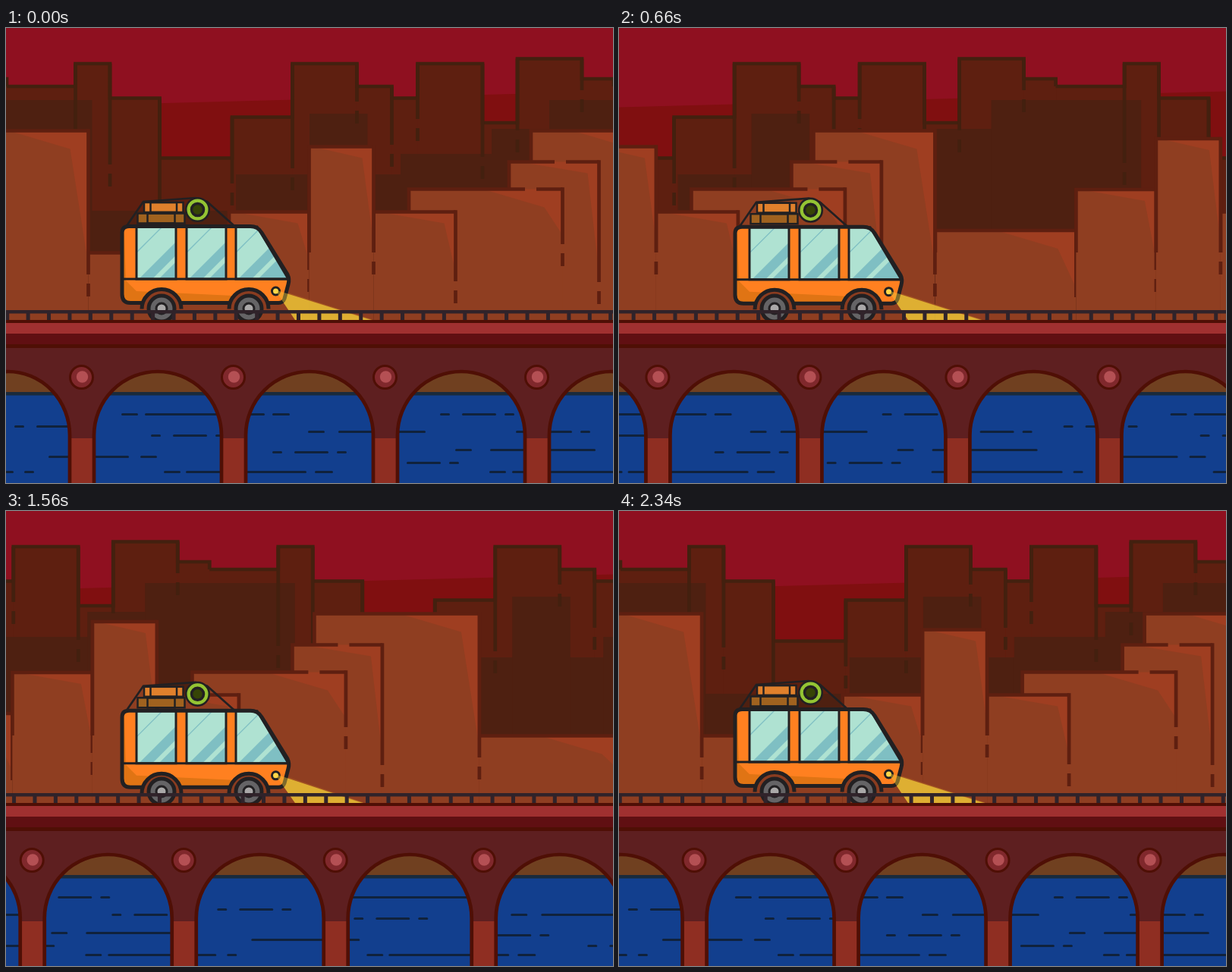
Write an HTML page with a canvas that moves like this. It is 800 px wide and 600 px high and loops after 2.4 s.

```html
<!DOCTYPE html>
<html lang="en">
<head>
<meta charset="utf-8">
<title>Van on a bridge</title>
<style>
html, body { margin: 0; width: 100%; height: 100%; overflow: hidden; background: #8f1020; }
canvas { display: block; width: 800px; height: 600px; }
</style>
</head>
<body>
<canvas id="stage" width="800" height="600"></canvas>
<script>
const ctx = document.getElementById('stage').getContext('2d');
const INK = '#222022', EDGE = '#4f0f05', FAR_EDGE = '#43200f', NEAR_EDGE = '#5e1f10';
const MINT = '#afe2d2', TEAL = '#7fbfc3';
const STEP = 60, STEPS = 40, CYCLE = 39;
const GROUND = 386;

// Pixels moved per step and width of each repeating layer
const FAR = { speed: 20.49, width: 800 };
const NEAR = { speed: 39.6, width: 1545 };
const BRIDGE = { speed: 40.78, width: 795 };

// Each far roof: left edge, height, where its left wall line breaks off
const roofs = [[1, 77], [91.5, 47, 178], [137, 92.5, 180], [202.5, 171.5, 290], [298, 117.5, 205],
  [377.5, 47, 185], [462.5, 77, 97], [508.5, 92.5, 154], [542.5, 47, 120], [628, 125, 170],
  [674, 40.5, 135], [759, 67, 82], [801, 77]];
const shades = [[113, 241], [303, 193], [400, 113], [476, 193], [520, 166], [640, 133], [716, 95], [913, 0]];

function rect(x, y, w, h, color) {
  ctx.fillStyle = color;
  ctx.fillRect(x, y, w, h);
}

function trace(points) {
  ctx.beginPath();
  points.forEach(([x, y]) => ctx.lineTo(x, y));
}

function fill(color) {
  ctx.fillStyle = color;
  ctx.fill();
}

function stroke(color, width) {
  ctx.strokeStyle = color;
  ctx.lineWidth = width;
  ctx.stroke();
}

function line(points, color, width) {
  trace(points);
  stroke(color, width);
}

function poly(points, color) {
  trace(points);
  fill(color);
}

function disc(x, y, r, color, edge, width) {
  ctx.beginPath();
  ctx.arc(x, y, r, 0, Math.PI * 2);
  fill(color);
  if (edge) stroke(edge, width);
}

// A wall line, then a gap and a short dash below it
function wall(x, top, end, color) {
  line([[x, top], [x, end]], color, 4.7);
  if (end < 350) line([[x, end + 12], [x, end + 29]], color, 4.7);
}

function tiled(layer, step, draw) {
  const first = -((layer.speed * step) % layer.width);
  for (let n = 1; n >= -1; n--) {
    ctx.save();
    ctx.translate(first + n * layer.width, 0);
    draw();
    ctx.restore();
  }
}

function sky() {
  rect(0, 0, 800, 400, '#8f1020');
  poly([[0, 104.4], [800, 83.4], [800, 400], [0, 400]], '#800f10');
}

function farCity(step) {
  const columns = (list, color) => list.slice(0, -1).forEach(([x, y], i) =>
    rect(x, y, list[i + 1][0] - x + 0.5, GROUND - y, color));
  tiled(FAR, step, () => columns(roofs, '#5e1f10'));
  tiled(FAR, step, () => columns(shades, '#4e2011'));
  tiled(FAR, step, () => {
    const before = i => roofs[Math.max(i - 1, 0)][1];
    line(roofs.flatMap(([x, y], i) => [[x, before(i)], [x, y]]), FAR_EDGE, 4.7);
    roofs.forEach(([x, y, end], i) => end && wall(x, Math.min(y, before(i)), end, FAR_EDGE));
  });
}

// end: where the right wall line breaks off; gap: start of a break in the roof line
function house(x, w, top, end, gap) {
  const r = x + w, edge = NEAR_EDGE;
  const lit = Math.min(w * 0.94, 105), bend = w < 150 ? 15 : 24;
  rect(x, top, w, GROUND - top, '#8f3e21');
  poly([[r - lit, top], [r - bend, top + bend], [r, end - 12], [r, top]], '#9f3e21');
  line([[x, Math.max(top, 296)], [x, top], [x + (gap || w), top]], edge, 4.7);
  if (gap) line([[x + gap + 15, top], [r, top]], edge, 4.7);
  wall(r, top - 2.3, end, edge);
}

function block(x, low, mid, high, lastWidth) {
  house(x + 583.5, lastWidth, 135.5, 325);
  house(x + 554.5, 118.5, 176.5, 335, 60);
  house(x + 422.5, 202.5, 212.5, 285, 153);
  house(x + 376, 108, 242.5, 334);
  house(x, 185.5, low, 355);
  house(x + 185.5, 105.5, mid, 319);
  house(x + 291, 85, high, 296);
}

function nearCity(step) {
  tiled(NEAR, step, () => {
    block(852.5, 267, 213, 146, 217.5);
    block(108.5, 296.5, 242.5, 156.5, 160);
  });
}

function water(step) {
  rect(0, GROUND, 800, 96, '#704020');
  rect(0, 482, 800, 118, '#123f8e');
  rect(0, 480, 800, 4.5, '#1a2a3c');
  const dash = (x, y, len) => line([[x + 1.5, y + 0.5], [x + len - 1.5, y + 0.5]], '#10223c', 3);
  const ripple = (x, y) => {
    dash(x, y, 13);
    dash(x + 29, y, 45);
    dash(x + 85, y, 13);
  };
  const swell = (x, y, gap, len) => {
    dash(x, y, 22);
    dash(x + 22 + gap, y, len);
  };
  ctx.lineCap = 'round';
  tiled(FAR, step, () => {
    ripple(11, 525);
    ripple(191, 537);
    ripple(351, 559);
    ripple(499, 573);
    ripple(572, 509);
    ripple(672, 532);
    swell(152, 509, 9, 158);
    swell(208, 585, 7, 159);
    swell(398, 532, 18, 115);
    swell(592, 556, 24, 139);
    swell(637, 585, 8, 143);
    dash(56, 565, 106);
    dash(177, 565, 22);
    dash(351, 509, 23);
    dash(407, 585, 24);
    dash(824, 585, 13);
  });
  ctx.lineCap = 'butt';
}

function vaults(pillars) {
  pillars.slice(0, -1).forEach((p, i) => {
    const a = p + 16, b = pillars[i + 1] - 16;
    ctx.moveTo(a, 605);
    ctx.lineTo(a, 537);
    ctx.ellipse((a + b) / 2, 537, (b - a) / 2, 84, 0, Math.PI, Math.PI * 2);
    ctx.lineTo(b, 605);
  });
}

function bridge(step) {
  const first = 100 - ((BRIDGE.speed * step) % BRIDGE.width);
  const pillars = [];
  for (let n = -1; n < 3; n++) {
    for (let i = 0; i < 4; i++) pillars.push(first + n * BRIDGE.width + i * 200);
  }
  ctx.beginPath();
  ctx.rect(-1800, 415, 4800, 190);
  vaults(pillars);
  ctx.fillStyle = '#5e1f20';
  ctx.fill('evenodd');
  pillars.forEach(p => rect(p - 16, 541, 32, 59, '#8f2e22'));
  ctx.beginPath();
  vaults(pillars);
  stroke(EDGE, 4.7);
  pillars.forEach(p => {
    disc(p - 0.5, 460.5, 15, '#80282c', EDGE, 3);
    disc(p + 0.5, 460, 7.7, '#b45054');
  });
  rect(0, 385, 800, 4, EDGE);
  rect(0, 389, 800, 14, '#a03030');
  rect(0, 403, 800, 14, '#600f12');
  rect(0, 417, 800, 5, EDGE);
}

function rail(step) {
  const gap = BRIDGE.width / 29;
  const first = 1.7 - ((BRIDGE.speed * step) % gap);
  for (let x = first; x < 805; x += gap) rect(x - 2.5, 375, 5, 10, '#30232a');
  rect(0, 372, 800, 4.5, '#30232a');
}

function bodyPath() {
  ctx.beginPath();
  ctx.moveTo(153, 270);
  ctx.quadraticCurveTo(153, 261.5, 162, 261.5);
  ctx.lineTo(322, 261.5);
  ctx.quadraticCurveTo(332, 261.5, 337, 270);
  ctx.lineTo(371, 325);
  ctx.quadraticCurveTo(374, 331, 372, 338);
  ctx.lineTo(367, 357);
  ctx.quadraticCurveTo(365, 362.5, 359, 362.5);
  ctx.lineTo(164, 362.5);
  ctx.quadraticCurveTo(153, 362.5, 153, 351);
  ctx.closePath();
}

// A window with a shaded corner and one reflected band
function pane(x, right, slant = 0) {
  const outline = [[x, 262], [right - slant, 262], [right, 331], [x, 331], [x, 262]];
  ctx.save();
  trace(outline);
  ctx.clip();
  fill(MINT);
  poly([[x + 72, 262], [x + 72, 331], [x + 3, 331]], TEAL);
  line([[x + 18, 338], [x + 88, 268]], MINT, 6);
  line([[x - 2, 298], [x + 36, 260]], TEAL, 1.3);
  ctx.restore();
  line(outline, INK, 3);
}

function suitcase(x, y, w, color, strap) {
  rect(x, y, w, 13, color);
  ctx.strokeStyle = INK;
  ctx.lineWidth = 2.5;
  ctx.strokeRect(x, y, w, 13);
  ctx.strokeRect(x + strap, y, w - 2 * strap, 13);
}

function luggage() {
  suitcase(173.5, 244.5, 62, '#a0621f', 13);
  suitcase(182, 230, 51.5, '#e0802c', 8.5);
  line([[159, 261], [181, 229], [250, 224], [265, 229], [301, 261]], INK, 2.7);
  disc(252.5, 239.5, 15.3, '#94c433', INK, 2.6);
  disc(252.5, 239.5, 8, '#364406', INK, 3.5);
}

function wheel(x) {
  disc(x, 370, 17, '#656466', INK, 5);
  disc(x, 370, 7, '#aaa8a8', INK, 3);
}

function fender(x) {
  ctx.beginPath();
  ctx.arc(x, 370.5, 26, Math.PI, Math.PI * 2);
  fill('#8a3c20');
  stroke(INK, 5);
}

function beam(y, tip, alpha) {
  poly([[357, y], [tip, 385], [381, 385], [357, y + 3]], `rgba(236,196,54,${alpha})`);
}

function van(step) {
  // The body bounces four times per cycle
  const phase = (step * 4 / CYCLE) % 1;
  const dip = 1 - Math.abs(1 - 2 * phase);
  const drop = dip * 2.7, glow = 346 + drop, tip = 482 - dip * 17;
  beam(glow, tip, 0.72);
  line([[372, glow + 4], [tip, 385]], 'rgba(170,90,35,0.7)', 1.5);
  ctx.save();
  ctx.translate(0, drop);
  luggage();
  bodyPath();
  fill('#ff8020');
  ctx.save();
  ctx.clip();
  poly([[150, 270], [156, 270], [158, 333], [172, 347], [300, 353], [300, 365], [150, 365]], '#e07414');
  ctx.restore();
  pane(172, 224);
  pane(238, 290);
  pane(303, 372, 41);
  line([[153, 331], [372, 331]], INK, 3);
  bodyPath();
  stroke(INK, 5);
  fender(205);
  fender(320);
  disc(355.5, 347, 5, '#ffd84a', INK, 3);
  ctx.restore();
  wheel(205);
  wheel(320);
  beam(glow, tip, 0.45);
}

function render() {
  const step = Math.floor((performance.now() - start) / STEP) % STEPS;
  sky();
  farCity(step);
  nearCity(step);
  van(step);
  rail(step);
  water(step);
  bridge(step);
  requestAnimationFrame(render);
}

const start = performance.now();
render();
</script>
</body>
</html>
```
